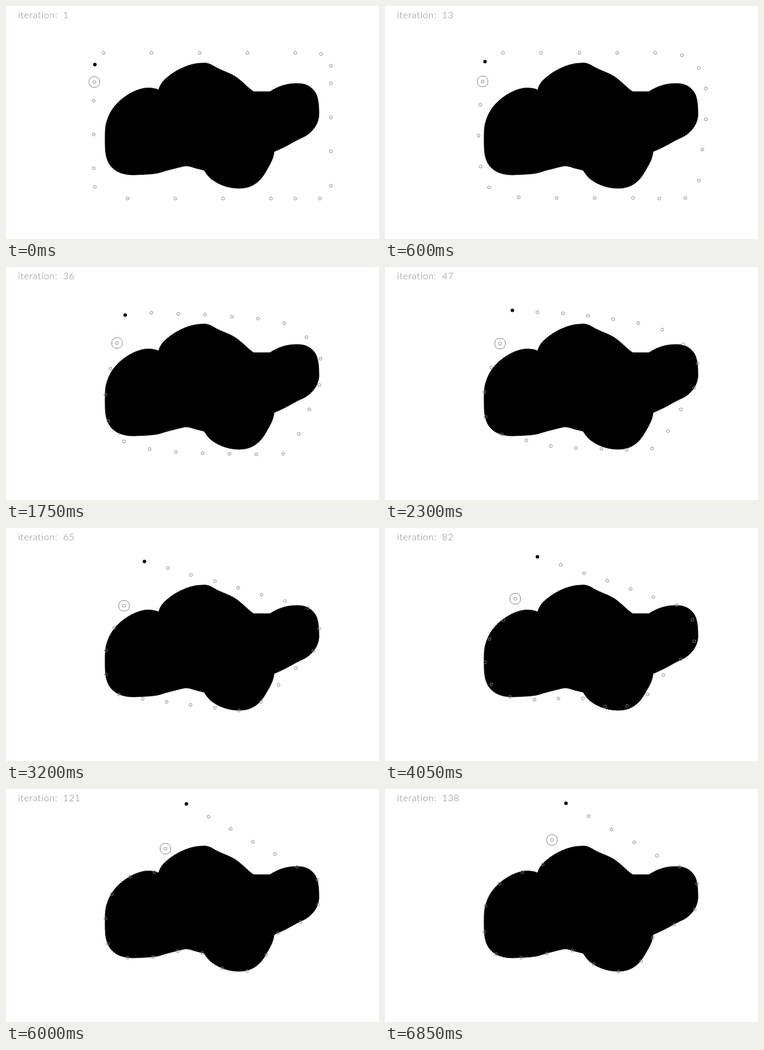
Animation, 640 px wide and 400 px high, one loop 6.9 s. Source, as an HTML page:

```html
<!DOCTYPE html>
<html lang="en">
<head>
<meta charset="utf-8">
<title>Active contour</title>
<style>
  html, body { margin: 0; width: 100%; height: 100%; overflow: hidden; background: #fff; }
  svg { display: block; width: 640px; height: 400px; }
  text { font: 300 16px Lato, sans-serif; fill: #858585; letter-spacing: .7px; }
  .node { fill: none; stroke: #888; }
</style>
</head>
<body>
<svg viewBox="0 0 640 400">
  <path id="blob" stroke="#000" stroke-width=".8" d="M262 144C264 135 270 128 275 124
    C292 109 316 98 337 98C345 97 351 100 356 103C368 111 388 115 400 126
    C408 132 417 142 425 147L453 147C465 139 480 133 498 133C516 132 528 141 533 153
    C537 164 537 178 537 188C536 198 532 208 522 217C515 224 505 227 496 232
    C484 239 472 245 460 250C459 262 453 272 446 284C436 302 422 313 400 313
    C378 313 361 304 351 296C346 291 343 287 340 282C333 280 326 279 321 277
    C315 275 310 274 305 275C293 278 284 280 270 284C258 289 240 289 219 290
    C197 290 183 282 176 269C170 257 170 245 170 226C170 210 171 203 174 195
    C178 182 186 171 196 162C210 150 225 143 238 141C247 140 255 141 262 144Z"/>
  <g id="nodes"></g>
  <rect id="ring" class="node" width="18" height="18" rx="7.5"/>
  <text x="20.5" y="20.5">iteration:</text>
  <text id="count" x="98" y="20.5">1</text>
</svg>
<script>
const STEP = 50, STEPS = 138, NODES = 23;
const byId = id => document.getElementById(id);
const blob = byId('blob'), ring = byId('ring'), count = byId('count');

const mix = (a, b, u) => [a[0] + (b[0] - a[0]) * u, a[1] + (b[1] - a[1]) * u];
const distance = (a, b) => Math.hypot(b[0] - a[0], b[1] - a[1]);

// n + 1 points from a to b.
const row = (a, b, n) => Array.from({ length: n + 1 }, (_, i) => mix(a, b, i / n));

const SAMPLES = 500;
const outline = Array.from({ length: SAMPLES }, (_, i) => {
  const p = blob.getPointAtLength(blob.getTotalLength() * i / SAMPLES);
  return [p.x, p.y];
});

// Convex hull, clockwise on screen.
function hull(points) {
  const half = sorted => {
    const chain = [];
    for (const p of sorted) {
      while (chain.length > 1) {
        const [a, b] = chain.slice(-2);
        if ((b[0] - a[0]) * (p[1] - a[1]) - (b[1] - a[1]) * (p[0] - a[0]) > 0) break;
        chain.pop();
      }
      chain.push(p);
    }
    return chain.slice(0, -1);
  };
  const sorted = [...points].sort((a, b) => a[0] - b[0] || a[1] - b[1]);
  return [...half(sorted), ...half(sorted.reverse())];
}

// Evenly spaced nodes on a closed loop; the last gap is counted in spacings.
function spread(loop, gap) {
  const closed = [...loop, loop[0]];
  const lengths = loop.map((p, i) => distance(p, closed[i + 1]));
  const spacing = lengths.reduce((a, b) => a + b) / (NODES - 1 + gap);
  let side = 0, passed = 0;
  return Array.from({ length: NODES }, (_, i) => {
    while (passed + lengths[side] < i * spacing) passed += lengths[side++];
    return mix(closed[side], closed[side + 1], (i * spacing - passed) / (lengths[side] || 1));
  });
}

// A band pulled tight around the blob, its tip and any pegs.
function taut(gap, tip, ...pegs) {
  const loop = hull([...outline, tip, ...pegs]);
  const first = loop.indexOf(tip);
  return spread([...loop.slice(first), ...loop.slice(0, first)], gap);
}

// A band that follows the blob from touch to leave and runs straight to the tip.
function clinging(gap, tip, touch, leave) {
  const nearest = p => outline.reduce((best, q, i) =>
    distance(p, q) < distance(p, outline[best]) ? i : best, 0);
  const from = nearest(touch), size = (nearest(leave) - from + SAMPLES) % SAMPLES;
  const arc = Array.from({ length: size + 1 }, (_, i) => outline[(from + i) % SAMPLES]);
  return spread([tip, ...arc], gap);
}

const rectangle = [
  [152, 100], ...row([167, 80], [496, 80], 4), [540, 82],
  [557, 102], ...row([557, 132], [557, 308], 3), [538, 330],
  [496, 330], ...row([454, 330], [208, 330], 3),
  [152, 310], ...row([150, 278], [150, 162], 2), [151, 130]
];

const poses = [
  { step: 0, points: rectangle },
  { step: 24, points: taut(.8, [190, 90], [215, 80], [448, 80], [500, 90], [535, 127],
    [550, 173], [517, 300], [490, 330], [253, 327], [200, 310]) },
  { step: 46, points: taut(1.4, [218, 74], [345, 82], [468, 102], [466, 311], [292, 309]) },
  { step: 64, points: taut(2, [237, 57]) },
  { step: 98, points: clinging(1.85, [285, 41], [520, 138], [221, 145]) },
  { step: 120, points: clinging(1.95, [309, 25], [500, 132], [254, 141]) },
  { step: 137, points: clinging(1.5, [310, 24], [500, 132], [270, 127]) }
];

const nodes = rectangle.map((_, i) => {
  const node = document.createElementNS('http://www.w3.org/2000/svg', 'circle');
  node.setAttribute('r', i ? 2.5 : 3);
  if (i) node.setAttribute('class', 'node');
  return byId('nodes').appendChild(node);
});

function place(el, attrs) {
  for (const name in attrs) el.setAttribute(name, attrs[name]);
}

function draw(time) {
  const step = Math.floor(time / STEP) % STEPS;
  const next = Math.max(1, poses.findIndex(pose => pose.step >= step));
  const from = poses[next - 1], to = poses[next];
  const u = (step - from.step) / (to.step - from.step);

  nodes.forEach((node, i) => {
    const [x, y] = mix(from.points[i], to.points[i], u).map(Math.round);
    place(node, { cx: x + .5, cy: y + .5 });
    if (i === NODES - 1) place(ring, { x: x - 8.5, y: y - 8.5 });
  });
  count.textContent = step + 1;
}

const start = performance.now();
function tick() {
  draw(Math.max(0, performance.now() - start));
  requestAnimationFrame(tick);
}
tick();
</script>
</body>
</html>
```
